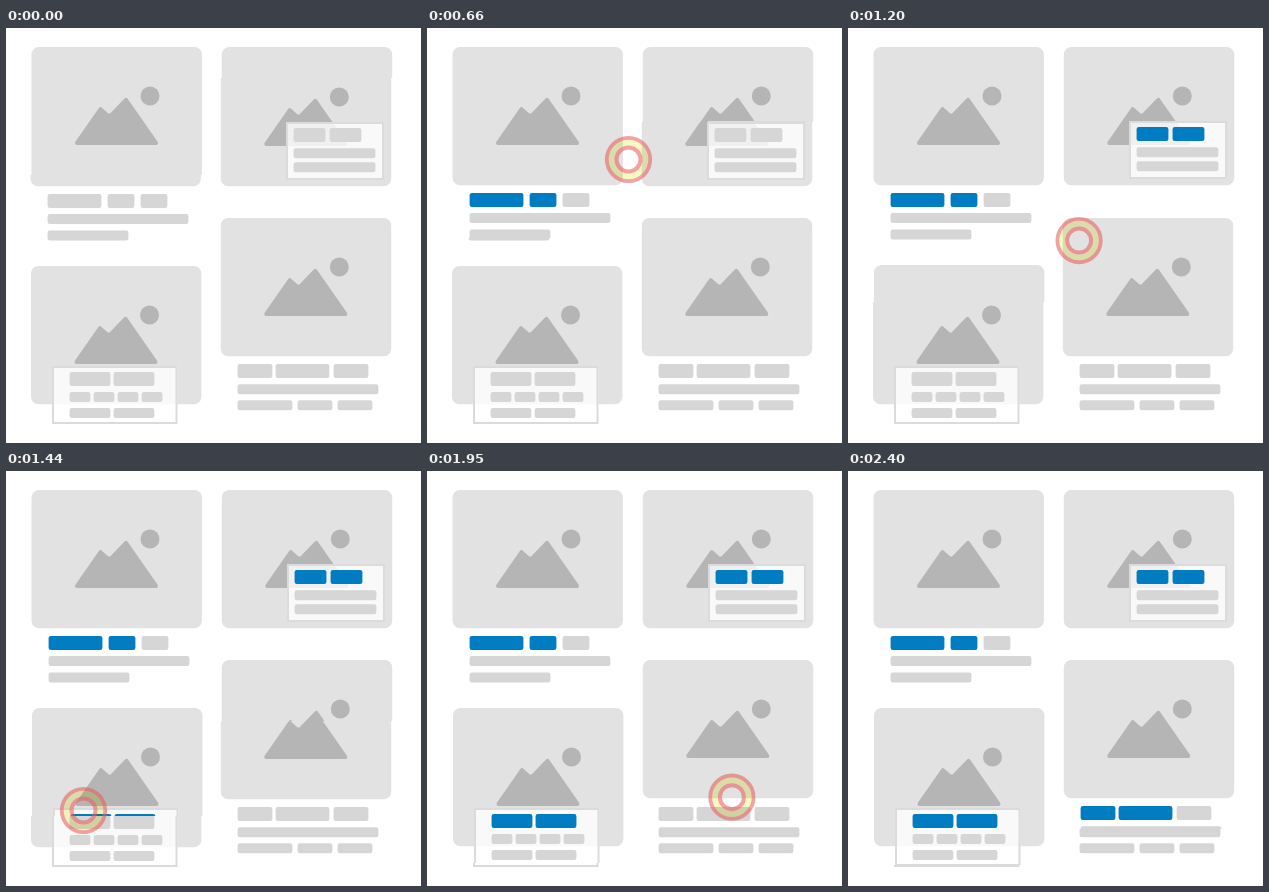
Write an HTML page with a canvas that moves like this. It is 415x415 px and loops after 2.46 s.

```html
<!DOCTYPE html>
<html lang="en">
<head>
<meta charset="utf-8">
<title>Gaze path</title>
<style>
html, body { margin: 0; width: 100%; height: 100%; overflow: hidden; background: #fff; }
canvas { display: block; width: 415px; height: 415px; }
</style>
</head>
<body>
<canvas id="stage" width="415" height="415"></canvas>
<script>
const SIZE = 415, LOOP = 2460, STEP = 30, SPLIT = 200;
const GREY = '#d6d6d6', BLUE = '#007dc2';
const ctx = document.getElementById('stage').getContext('2d');

// turning points of the gaze ring: time, x, y
const PATH = [
  [0, 268, -32], [360, 58, 168], [660, 201.5, 131.5], [990, 365.5, 101.5],
  [1440, 77.5, 339.5], [1470, 66, 346], [1710, 184.5, 340.5],
  [2020, 340, 322], [2160, 287.5, 365.5], [2400, 198, 447]
];

// how far down each column has been read: time, y
const LEFT = [[0, 147], [360, 189], [1080, 239], [1440, 345], [1710, 390], [2160, 394]];
const RIGHT = [[0, 50], [660, 94], [900, 115], [1080, 130], [1440, 250], [2130, 358]];

function at(keys, t) {
  const i = keys.findIndex(k => k[0] >= t);
  if (i < 0) return keys.at(-1).slice(1);
  const b = keys[i], a = keys[i - 1] || b;
  const k = (t - a[0]) / (b[0] - a[0] || 1);
  return a.slice(1).map((v, n) => v + (b[n + 1] - v) * k);
}

function box(x, y, w, h, r, fill) {
  ctx.fillStyle = fill;
  ctx.beginPath();
  ctx.roundRect(x, y, w, h, r);
  ctx.fill();
}

function card(x, y) {
  box(x, y, 170.4, 138.3, 7.5, '#e2e2e2');
  ctx.save();
  ctx.translate(x + 43.5, y);
  ctx.fillStyle = ctx.strokeStyle = '#b5b5b5';
  ctx.lineWidth = 4;
  ctx.lineJoin = 'round';
  ctx.beginPath();
  ctx.moveTo(2, 96);
  ctx.lineTo(25.5, 62.2);
  ctx.lineTo(32, 68);
  ctx.quadraticCurveTo(34.5, 69.5, 37, 67.5);
  ctx.lineTo(51, 52.8);
  ctx.lineTo(81, 96);
  ctx.closePath();
  ctx.fill();
  ctx.stroke();
  ctx.beginPath();
  ctx.arc(75, 49, 9.5, 0, 7);
  ctx.fill();
  ctx.restore();
}

function panel(x, y, w, h) {
  ctx.fillStyle = 'rgba(255,255,255,.8)';
  ctx.fillRect(x, y, w, h);
  ctx.strokeStyle = '#dbdbdb';
  ctx.lineWidth = 2;
  ctx.strokeRect(x + 1, y + 1, w - 2, h - 2);
}

// one row of text bars, separated by gap
function row(x, y, h, gap, widths, fill = GREY) {
  for (const w of widths) {
    box(x - 0.4, y, w + 0.8, h, 2.2, fill);
    x += w + gap;
  }
  return x;
}

const title = (x, y, gap, widths, fill) => row(x, y, 14, gap, widths, fill);
const line = (x, y, gap, ...widths) => row(x, y, 10, gap, widths);

function page(color) {
  ctx.fillStyle = '#fff';
  ctx.fillRect(-2, -2, SIZE + 4, SIZE + 4);
  card(25.5, 19);
  card(215.8, 19);
  card(26, 237);
  card(215.8, 189);
  panel(281, 93, 98, 58);
  panel(47, 337, 125.5, 58);

  title(title(43, 165, 7, [53, 26], color), 165, 0, [26]);
  line(43, 185, 0, 140);
  line(43, 201.5, 0, 80);

  title(289, 99, 5, [31, 31], color);
  line(289, 119.3, 0, 81);
  line(289, 133.3, 0, 81);

  title(65, 343, 4, [40, 40], color);
  line(65, 363, 4, 20, 20, 20, 20);
  line(65, 379, 4, 40, 40);

  title(title(233, 335, 4, [34, 53], color) + 1, 335, 0, [34]);
  line(233, 355.2, 0, 140);
  line(233, 371.3, 6, 54, 34, 34);
}

function circle(x, y, r, width, color) {
  ctx.strokeStyle = color;
  ctx.lineWidth = width;
  ctx.beginPath();
  ctx.arc(x, y, r, 0, 7);
  ctx.stroke();
}

function ring(x, y) {
  const red = 'rgba(233,90,90,.56)';
  ctx.globalCompositeOperation = 'multiply';
  circle(x, y, 16.9, 6, '#f8f8c2');
  ctx.globalCompositeOperation = 'source-over';
  circle(x, y, 21.7, 3.8, red);
  circle(x, y, 12, 4, red);
}

function draw(time) {
  const t = Math.min(Math.floor((time % LOOP) / STEP) * STEP, LOOP - 2 * STEP);

  // the unread page sits one pixel down and left
  ctx.save();
  ctx.translate(-1, 1);
  page(GREY);
  ctx.restore();

  ctx.save();
  ctx.beginPath();
  ctx.rect(0, 0, SPLIT, Math.round(at(LEFT, t)[0]));
  ctx.rect(SPLIT, 0, SIZE - SPLIT, Math.round(at(RIGHT, t)[0]));
  ctx.clip();
  page(BLUE);
  ctx.restore();

  ring(...at(PATH, t));
}

const start = performance.now();
function tick() {
  draw(performance.now() - start);
  requestAnimationFrame(tick);
}
tick();
</script>
</body>
</html>
```
